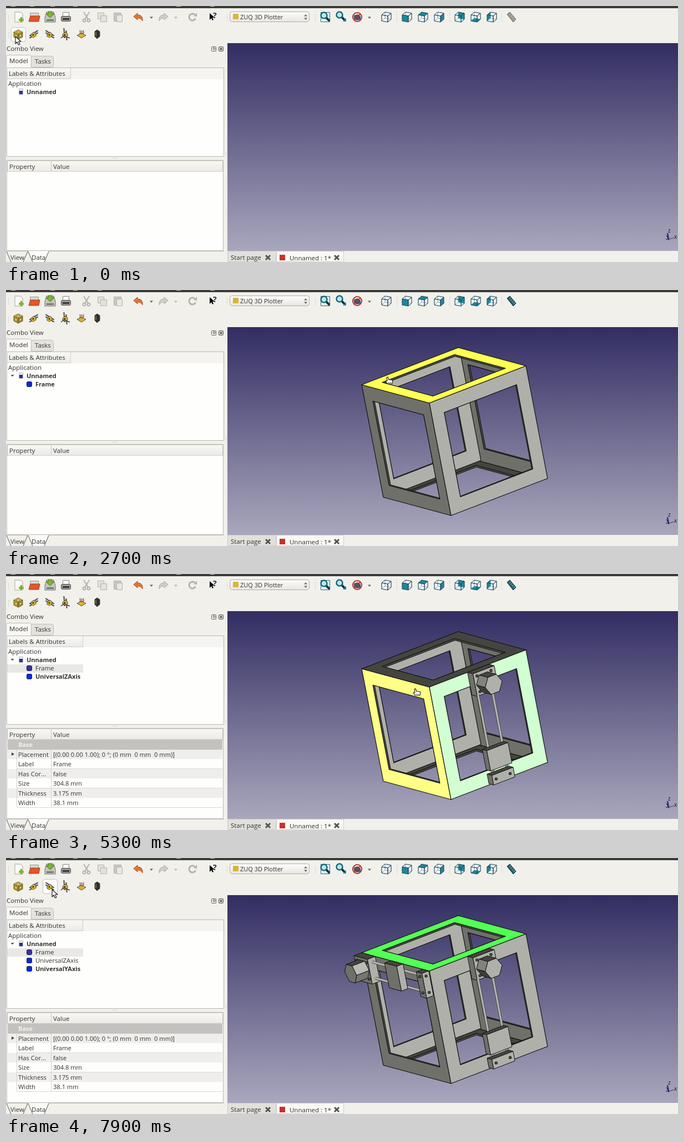
Animation, 1211 px wide and 462 px high, one loop 8000 ms. Source, as an HTML page with a canvas:

```html
<!DOCTYPE html>
<html lang="en">
<head>
<meta charset="utf-8">
<title>Printer frame modelling</title>
<style>
html, body { margin: 0; width: 100%; height: 100%; overflow: hidden; background: #f1f0eb; }
canvas { display: block; width: 1211px; height: 462px; }
</style>
</head>
<body>
<canvas id="stage" width="1211" height="462"></canvas>
<script>
const ctx = document.getElementById('stage').getContext('2d');
const LOOP = 8000, INK = '#33322f', EDGE = '#10100e', GREY = '#55544f', TEAL = '#168a9c', GOLD = '#d8b535';
const FRAME_AT = 1100, MENU_AT = 1700, MENU_END = 1900, Z_AT = 4600, Y_AT = 6400;

// Pointer moves: from, until, x, y
const MOVES = [
  [800, 900, 26, 56], [1000, 1500, 504, 183], [1800, 2000, 466, 140], [2100, 2300, 181, 80],
  [2300, 2600, 690, 158], [2700, 2900, 716, 203], [2900, 3400, 761, 203], [3400, 3500, 775, 211],
  [3600, 4200, 99, 55], [4300, 4400, 100, 55], [4500, 5300, 740, 208], [5500, 6200, 52, 56],
  [6400, 6900, 657, 162], [6900, 7000, 667, 163], [7400, 7900, 83, 57]
];
function pointer(t) {
  let p = [17, 55];
  for (const [a, b, x, y] of MOVES) {
    if (t <= a) break;
    const k = Math.min(1, (t - a) / (b - a));
    p = [p[0] + (x - p[0]) * k, p[1] + (y - p[1]) * k];
  }
  return p;
}

// ---- drawing helpers ----
function box(x, y, w, h, fill, edge) {
  if (fill) { ctx.fillStyle = fill; ctx.fillRect(x, y, w, h); }
  if (edge) { ctx.strokeStyle = edge; ctx.lineWidth = 1; ctx.strokeRect(x + .5, y + .5, w - 1, h - 1); }
}
function paint(fill, edge, w = 1) {
  if (fill) { ctx.fillStyle = fill; ctx.fill('evenodd'); }
  if (edge) { ctx.strokeStyle = edge; ctx.lineWidth = w; ctx.lineJoin = 'round'; ctx.stroke(); }
}
function pill(x, y, w, h, r, fill, edge) {
  ctx.beginPath(); ctx.roundRect(x + .5, y + .5, w - 1, h - 1, r); paint(fill, edge);
}
function trace(points, dx = 0, dy = 0) {
  const p = points.flat();
  for (let i = 0; i < p.length; i += 2) ctx[i ? 'lineTo' : 'moveTo'](p[i] + dx, p[i + 1] + dy);
}
function rings(list, fill, edge, w) {
  ctx.beginPath();
  for (const p of list) { trace(p); ctx.closePath(); }
  paint(fill, edge, w);
}
function poly(p, fill, edge = EDGE, w = 1, dx = 0, dy = 0) {
  ctx.beginPath(); trace(p, dx, dy); ctx.closePath(); paint(fill, edge, w);
}
function line(p, color, w = 1, dx = 0, dy = 0) {
  ctx.beginPath(); trace(p, dx, dy); paint(null, color, w);
}
function cross(x, y, r, color, w) {
  line([x - r, y - r, x + r, y + r], color, w); line([x + r, y - r, x - r, y + r], color, w);
}
function disc(x, y, r, fill, edge, w) {
  ctx.beginPath(); ctx.arc(x, y, r, 0, 7); paint(fill, edge, w);
}
function text(s, x, y, size = 11.5, color = INK, bold = false) {
  ctx.font = `${bold ? 'bold ' : ''}${size}px "Open Sans", "Noto Sans", sans-serif`;
  ctx.fillStyle = color;
  ctx.fillText(s, x, y + 4);
}
function fade(y0, y1, a, b) {
  const g = ctx.createLinearGradient(0, y0, 0, y1);
  g.addColorStop(0, a); g.addColorStop(1, b);
  return g;
}
const caret = (x, y, c, up = 1) => poly([-3, -1.5 * up, 3, -1.5 * up, 0, 2 * up], c, null, 1, x, y);
function grip(x, y, n, dx, dy) {
  for (let i = 0; i < n; i++) box(x + i * dx, y + i * dy, 1, 1, '#aaa9a4');
}

// ---- parallel projection: u to the right, v to the front, w down ----
const lift = (o, ...axes) => p =>
  axes.reduce((q, e, i) => [q[0] + e[0] * p[i], q[1] + e[1] * p[i]], o);
function square(axis, depth, inset = 0) {
  const a = inset, b = 1 - inset;
  return [[a, a], [b, a], [b, b], [a, b]].map(k => (k.splice(axis, 0, depth), k));
}
const ORIGIN = [641, 171], AXES = [[174, -67], [122, 33], [39, 203]];
const see = lift(ORIGIN, ...AXES);
const LEFT = 0, FRONT = 1, TOP = 2;
const NEAR = [0, 1, 0], INWARD = [1, -1, 1];   // visible sides of the unit cube
const TONE = [112, 176, 69];                   // headlight brightness of those sides
const RIM = .125, THICK = .016;

const grey = s => `rgb(${s},${s},${s - 5})`;
const glow = axis => Math.round(TONE[axis] * 1.17 + 3);
const yellow = axis => `rgb(255,255,${glow(axis)})`;
const green = axis => `rgb(${glow(axis)},255,${glow(axis)})`;

function solid(points, normal) {
  const s = normal.reduce((sum, n, i) => sum - n * TONE[i] * INWARD[i], 0);
  if (s > 0) poly(points.map(see), grey(Math.round(s)));
}
function cuboid(p, q) {
  const lo = p.map((x, i) => Math.min(x, q[i])), hi = p.map((x, i) => Math.max(x, q[i]));
  for (const axis of [TOP, LEFT, FRONT]) {
    const side = square(axis, NEAR[axis]).map(k => k.map((x, i) => lo[i] + (hi[i] - lo[i]) * x));
    solid(side, [0, 1, 2].map(i => i === axis ? -INWARD[i] : 0));
  }
}
function plate(axis, depth, fill) {
  const [outer, hole, back] = [[depth, 0], [depth, RIM], [depth + THICK * INWARD[axis], RIM]]
    .map(([d, inset]) => square(axis, d, inset).map(see));
  ctx.save();
  ctx.beginPath(); trace(hole); ctx.clip();
  rings([hole, back], '#4a4b46', EDGE, 1);
  ctx.restore();
  rings([outer, hole], fill, EDGE, 1.2);
}

// Screen point in the coordinates of a visible side
function onSide(axis, x, y) {
  const o = see(square(axis, NEAR[axis])[0]);
  const [e, f] = AXES.filter((_, i) => i !== axis), det = e[0] * f[1] - e[1] * f[0];
  const dx = x - o[0], dy = y - o[1];
  return [(dx * f[1] - dy * f[0]) / det, (e[0] * dy - e[1] * dx) / det];
}
function hovered(x, y) {
  const within = (p, m) => p.every(k => k > m && k < 1 - m);
  return [LEFT, FRONT, TOP].findIndex(axis => {
    const p = onSide(axis, x, y);
    return within(p, .02) && !within(p, RIM);
  });
}

// A motor rail; place maps along, across and outward to the cube
function rail(place, carriage, turn) {
  const at = (...k) => see(place(...k));
  const zero = place(0, 0, 0), way = (...k) => place(...k).map((x, i) => x - zero[i]);
  const block = (from, to, out) => cuboid(place(from, 0, 0), place(to, .22, out));
  const rods = [.035, .18];
  const bolt = p => disc(...p, 2, '#666761', EDGE, 1.2);

  block(0, .2, .08);
  for (const q of rods) {
    for (const s of [.03, .17]) bolt(at(s, q, .08));
    const rod = [at(.2, q, .04), at(.92, q, .04)];
    line(rod, '#41423e', 5); line(rod, '#b4b4af', 3.2);
  }
  block(carriage, carriage + .18, .065);
  block(.905, .99, .07);
  for (const q of rods) {
    bolt(at(.947, q, .07));
    if (place(1, 0, 0)[1] > place(0, 0, 0)[1]) bolt(at(.99, q, .035));
  }
  const corner = (i, out) => {
    const a = turn + i * Math.PI / 3;
    return place(.105 + .087 * Math.cos(a), .1 + .087 * Math.sin(a), out);
  };
  for (let i = 0; i < 6; i++) {
    const a = turn + (i + .5) * Math.PI / 3;
    solid([corner(i, .08), corner(i + 1, .08), corner(i + 1, .21), corner(i, .21)],
      way(Math.cos(a), Math.sin(a), 0));
  }
  solid([0, 1, 2, 3, 4, 5].map(i => corner(i, .21)), way(0, 0, 1));
}

function view(t, hot, edge) {
  ctx.save();
  ctx.beginPath(); ctx.rect(399, 67, 812, 375); ctx.clip();
  box(399, 67, 812, 375, fade(67, 442, '#322d62', '#a9a7bd'));
  if (t >= FRAME_AT) {
    const pick = t >= 7200 ? TOP : t >= 5400 ? LEFT : t >= 3600 ? FRONT : -1;
    for (const axis of [TOP, LEFT, FRONT]) {
      plate(axis, 1 - NEAR[axis] - THICK * INWARD[axis], grey(TONE[axis]));
    }
    for (const axis of [LEFT, TOP, FRONT]) {
      plate(axis, NEAR[axis], axis === pick ? green(axis) : axis === hot ? yellow(axis) : grey(TONE[axis]));
    }
    if (t >= Z_AT) rail((s, q, h) => [.395 + q, 1 + h, s], .686, Math.PI / 6);
    if (t >= Y_AT) rail((s, q, h) => [-h, s, q], .43, 0);
    if (edge) line([see([0, 0, 0]), see([1, 0, 0])], '#f39a22', 1.6);
  }
  line([1194, 421, 1204, 418], '#8c2630', 1.2);
  line([1189, 421, 1194, 421], '#178b2c', 2);
  line([1194, 421, 1192, 410], '#1717a5', 2);
  line([1190, 414, 1195, 423], '#16161a');
  text('z', 1193, 405, 10, '#16161a'); text('x', 1204, 416, 10, '#16161a');
  ctx.restore();
}

// ---- toolbar ----
function bentArrow(x, dir, fill, edge) {
  ctx.save(); ctx.translate(x, 20); ctx.scale(dir, 1);
  ctx.beginPath();
  trace([-9, -1, -2, -7, -2, -4]);
  ctx.quadraticCurveTo(8, -4, 7, 7); ctx.quadraticCurveTo(4, 1, -2, 2);
  ctx.lineTo(-2, 5); ctx.closePath();
  paint(fill, edge);
  ctx.restore();
}
function viewCube(x, axis, depth) {
  const p = lift([x - 8, 16], [11, 2], [6, -5], [0, 11]);
  const side = (a, d) => square(a, d).map(p);
  for (const s of [[1, 1], [0, 0], [2, 1]]) poly(side(...s), '#f4f8f8', '#6f8c98', .6);
  if (axis !== undefined) poly(side(axis, depth), TEAL, null);
  for (const s of [[1, 0], [2, 0], [0, 1]]) poly(side(...s), null, '#244b60');
}
function lens(x, y) {
  line([x + 1, y + 1, x + 8, y + 8], '#0d3a48', 4);
  disc(x - 2, y - 2, 5.5, '#bfe5e9', '#116b7b', 2.5);
}
function fileIcons() {
  const dim = '#b3b2ac';
  poly([-7, -9, 3, -9, 7, -5, 7, 9, -7, 9], '#fbfbf8', '#a5a59f', 1, 23, 20);
  line([23, 25, 32, 25], '#78b520', 3.5); line([27.5, 20, 27.5, 29], '#78b520', 3.5);
  box(43, 12, 16, 15, '#d8d6cf', '#999');
  poly([41, 28, 44, 18, 61, 18, 59, 28], '#e2562a', '#a93c18');
  poly([70, 21, 73, 11, 86, 11, 89, 21, 89, 29, 70, 29], '#c5c6c0', '#70716c');
  poly([76, 10, 83, 10, 83, 14, 87, 14, 79.5, 21, 72, 14, 76, 14], '#7fb62f', '#477614');
  box(73, 24, 13, 3, '#777872');
  box(102, 11, 12, 9, '#fff', '#888');
  pill(99, 18, 18, 10, 2, '#9a9b96', '#4b4c48'); box(102, 22, 12, 3, '#333');
  line([140, 11, 148, 24], dim, 2); line([150, 11, 142, 24], dim, 2);
  for (const x of [141, 149]) disc(x, 26, 2.5, null, dim, 2);
  for (const k of [0, 5]) box(165 + k, 12 + k, 12, 12, '#e3e2dd', dim);
  box(194, 12, 14, 16, '#c8c7c1', dim); box(199, 16, 11, 13, '#e9e8e4', dim);
  bentArrow(239, 1, '#e6762b', '#aa481b'); caret(262, 21, '#65645f');
  bentArrow(283, -1, '#cfcec9', '#aaa9a4'); caret(306, 21, '#b5b4af');
  ctx.beginPath(); ctx.arc(336, 20, 6, .4, 5.4); paint(null, dim, 3);
  poly([338, 18, 344, 12, 344, 19], dim, null);
  poly([367, 13, 367, 25, 370, 22, 372, 26, 374, 25, 372, 21, 376, 21], '#000', null);
  text('?', 373, 18, 14, '#16305c', true);
}
function partIcon(i, x, y) {
  const p = (a, c) => poly(a, c, '#39300c', .8, x, y);
  if (i === 0) {
    const iso = lift([x - 8, y - 4], [8, -4], [8, 4], [0, 9]);
    ['#c9a62c', '#b29328', '#e5ca55'].forEach((c, axis) => {
      poly(square(axis, NEAR[axis]).map(iso), c, '#4d400f', .8);
      poly(square(axis, NEAR[axis], .28).map(iso), '#efe6bf', '#6b5a18', .8);
    });
  } else if (i < 4) {
    const a = [-.56, .56, 1.5][i - 1], c = 9 * Math.cos(a), s = 9 * Math.sin(a);
    for (const k of [-2, 2]) line([-c, k - s, c, k + s], '#4c4c47', 2, x + (i === 3 ? k : 0), y);
    p([-5, 0, 0, -4, 4, -1, 4, 3, -1, 6, -5, 4], GOLD);
    disc(x - 1, y + 1, 1.6, '#39300c');
    if (i === 3) line([-8, 7, -3, 3, 3, 5, 8, 7], '#444', 1.5, x, y);
  } else if (i === 4) {
    p([-8, 2, 0, -2, 8, 2, 0, 7], GOLD);
    for (const k of [-3, 0, 3]) line([k, -7, k + 1, -4, k, 0], '#753d19', 1.2, x, y);
  } else {
    p([-4, -5, 0, -8, 5, -5, 5, 4, 0, 8, -4, 4], '#31312f');
    line([-2, -4, -2, 3], '#777', 1.5, x, y);
  }
}
function toolbar(t, mx, my) {
  box(0, 0, 1211, 67, '#f1f0eb');
  box(0, 0, 1211, 4, '#3c3b37');
  for (const x of [9, 43, 80, 121, 165, 307, 368]) box(x, 0, 8, 1, '#c8c6bd');
  for (const [x, y] of [[4, 16], [398, 16], [557, 16], [4, 48]]) grip(x, y, 4, 0, 3);
  fileIcons();
  pill(403, 10, 144, 19, 4, fade(10, 29, '#fdfdfc', '#e7e6e1'), '#aeada7');
  box(409, 14, 10, 10, GOLD);
  text('ZUQ 3D Plotter', 422, 20, 11);
  caret(540, 23, '#666'); caret(540, 17, '#666', -1);
  box(567, 11, 17, 18, '#f7fafa', '#22657a'); lens(575, 19); lens(603, 18);
  poly([607, 28, 613, 28, 613, 22], TEAL, null);
  poly([627, 17, 634, 15, 639, 19, 639, 25, 632, 26, 627, 23], '#35597e', null);
  disc(633, 20, 8, null, '#c42b16', 2); line([627, 26, 639, 14], '#c42b16', 2);
  caret(655, 21, '#65645f');
  for (const x of [704, 799, 893]) box(x, 11, 1, 18, '#dddcd6');
  viewCube(685);
  for (let i = 0; i < 6; i++) viewCube(722 + i * 29 + (i > 2 ? 8 : 0), [1, 2, 0][i % 3], (i % 3 === 2) ^ (i > 2));
  const on = t >= FRAME_AT;
  poly([-8, -5, -3, -9, 8, 4, 3, 9], on ? '#27606b' : '#96968f', on ? '#0b2730' : '#71716b', 1, 911, 20);
  for (let i = 0; i < 4; i++) line([-1, -6, -4, -4], on ? '#9cc' : '#ccc', 1, 911 + i * 2.5, 20 + i * 3);
  for (let i = 0; i < 6; i++) {
    const x = Math.round(22 + i * 28.4);
    if (my > 38 && my < 65 && Math.abs(mx - x) < 13) {
      pill(x - 13, 38, 27, 27, 4, t >= 600 && t < 900 ? '#dddcd6' : '#fdfdfc', '#c1c0ba');
    }
    partIcon(i, x, 51);
  }
}

// ---- side panel ----
function tree(t) {
  const col = t >= Z_AT ? 139 : 117;
  box(1, 111, 392, 161, '#fefefd', '#b9b8b1');
  box(2, 112, 390, 20, '#f5f4f1');
  box(2, 112, col - 2, 20, fade(112, 132, '#f8f8f5', '#eceae6'));
  line([2, 131.5, col, 131.5], '#cfcec8'); line([col - .5, 112, col - .5, 132], '#cfcec8');
  text('Labels & Attributes', 5, 122);
  text('Application', 4, 140);
  box(23, 149, 8, 11, '#f3f3f4', '#b5b5b5'); box(24, 153, 6, 6, '#2632a8');
  text('Unnamed', 37, 155, 11, INK, true);
  const items = [['Frame', FRAME_AT], ['UniversalZAxis', Z_AT], ['UniversalYAxis', Y_AT]].filter(v => t >= v[1]);
  if (items.length) caret(11.5, 154.5, GREY);
  items.forEach(([name], i) => {
    const y = 170 + i * 15, picked = !i && t >= 3600, last = i === items.length - 1;
    if (picked) box(2, 163, col - 2, 15, '#e9e8e5');
    pill(37, y - 5, 10, 10, 2, picked ? '#3e2f9b' : '#0a2bd4', '#071770');
    text(name, 53, y, last ? 11 : 11.4, INK, last);
  });
}
function properties(t) {
  box(1, 278, 391, 164, '#fefefd', '#b9b8b1');
  box(2, 279, 389, 20, fade(279, 299, '#f8f8f5', '#eceae6'), '#cfcec8');
  line([81.5, 280, 81.5, 298], '#c6c5bf');
  text('Property', 6, 290); text('Value', 85, 290);
  if (t < 3600) return;
  box(3, 299, 387, 18, '#c3c2be');
  text('Base', 22, 308, 11, '#f1f0ed', true);
  const rows = {
    Placement: '[(0.00 0.00 1.00); 0 °; (0 mm  0 mm  0 mm)]', Label: 'Frame', 'Has Cor...': 'false',
    Size: '304.8 mm', Thickness: '3.175 mm', Width: '38.1 mm'
  };
  Object.entries(rows).forEach(([k, v], i) => {
    const y = Math.round(326 + i * 17.4);
    box(3, y - 9, 387, 17, i % 2 ? '#fefefd' : '#efeeec');
    box(20, y + 8, 370, 1, '#d8d7d2');
    text(k, 22, y, 11.2); text(v, 85, y, 11.1);
  });
  for (const x of [19, 81]) box(x, 317, 1, 104, '#d3d2cd');
  poly([10, 322, 15, 325, 10, 328], '#44433f', null);
}
function panel(t) {
  box(0, 67, 399, 395, '#f1f0eb');
  text('Combo View', 1, 77);
  for (const x of [370, 383]) pill(x, 73, 9, 9, 1, '#f8f8f5', GREY);
  box(373, 75, 4, 4, null, GREY);
  cross(387.5, 77.5, 2.5, '#444', 1.4);
  pill(45, 90, 41, 21, 3, '#e3e2dc', '#bebdb6');
  pill(0, 88, 46, 25, 3, '#f8f7f4', '#bebdb6');
  text('Model', 6, 99); text('Tasks', 52, 100);
  tree(t);
  grip(193, 274, 3, 3, 0); grip(396, 264, 3, 0, 3);
  properties(t);
  line([0, 442.5, 393, 442.5], '#c4c3bd');
  poly([40, 442, 77, 442, 69, 462, 48, 462], '#fbfbf8', null);
  for (const x of [1, 40]) line([x, 443, x + 8, 462], GREY);
  for (const x of [39, 77]) line([x, 443, x - 8, 462], GREY);
  text('View', 8, 454); text('Data', 46, 454);
}
function docTabs() {
  box(393, 442, 818, 20, '#f1f0eb');
  box(399, 442, 88, 20, '#e2e0da', '#cfcec8');
  box(487, 442, 122, 20, '#f9f8f5', '#cfcec8');
  text('Start page', 405, 454); text('Unnamed : 1*', 511, 455);
  box(493, 449, 10, 10, '#cc302a');
  for (const x of [472, 596]) cross(x, 454, 4, GREY, 3);
}

function menu() {
  box(501, 178, 149, 132, 'rgba(0,0,0,.2)');
  box(499, 176, 149, 133, '#3c3b37', '#2c2b28');
  box(500, 177, 147, 17, fade(177, 194, '#f0794c', '#d95a2b'));
  ['Fit all', 'Fit selection', 'Draw style', 'Standard views', 'Measure', 'Document window', 'Navigation styles']
    .forEach((s, i) => {
      const y = 185 + i * 18.2 + (i > 4 ? 5.5 : 0);
      text(s, 520, y, 11.3, i ? '#dfdbd2' : '#fff');
      if (i > 1) poly([639, y - 2, 642, y, 639, y + 2], '#dfdbd2', null);
    });
  line([501, 270, 646, 270], '#4a4944');
}
function cursor(x, y, hand) {
  if (hand) {
    poly([-4, 0, -2, -1, 0, 4, 5, 4, 7, 6, 6, 11, -3, 11, -6, 6, -3, 6], '#fff', '#222', 1.2, x, y);
    line([-2, 9, 5, 9], '#777', 1, x, y);
  } else {
    poly([0, 0, 0, 13, 3, 10, 5.5, 15, 8, 14, 5.5, 9, 10, 9], '#fff', '#222', 1.2, x, y);
  }
}
function draw(now) {
  const t = Math.floor(now % LOOP / 100) * 100;
  const [x, y] = pointer(t);
  const hot = t < FRAME_AT ? -1 : hovered(x, y);
  const [u, v] = onSide(TOP, x, y), edge = u > 0 && u < .9 && v > -.05 && v < .02;
  toolbar(t, x, y);
  panel(t);
  view(t, hot, edge);
  docTabs();
  if (t >= MENU_AT && t < MENU_END) menu();
  cursor(Math.round(x), Math.round(y), hot >= 0);
}
const start = performance.now();
(function tick() {
  draw(performance.now() - start);
  requestAnimationFrame(tick);
})();
</script>
</body>
</html>
```
